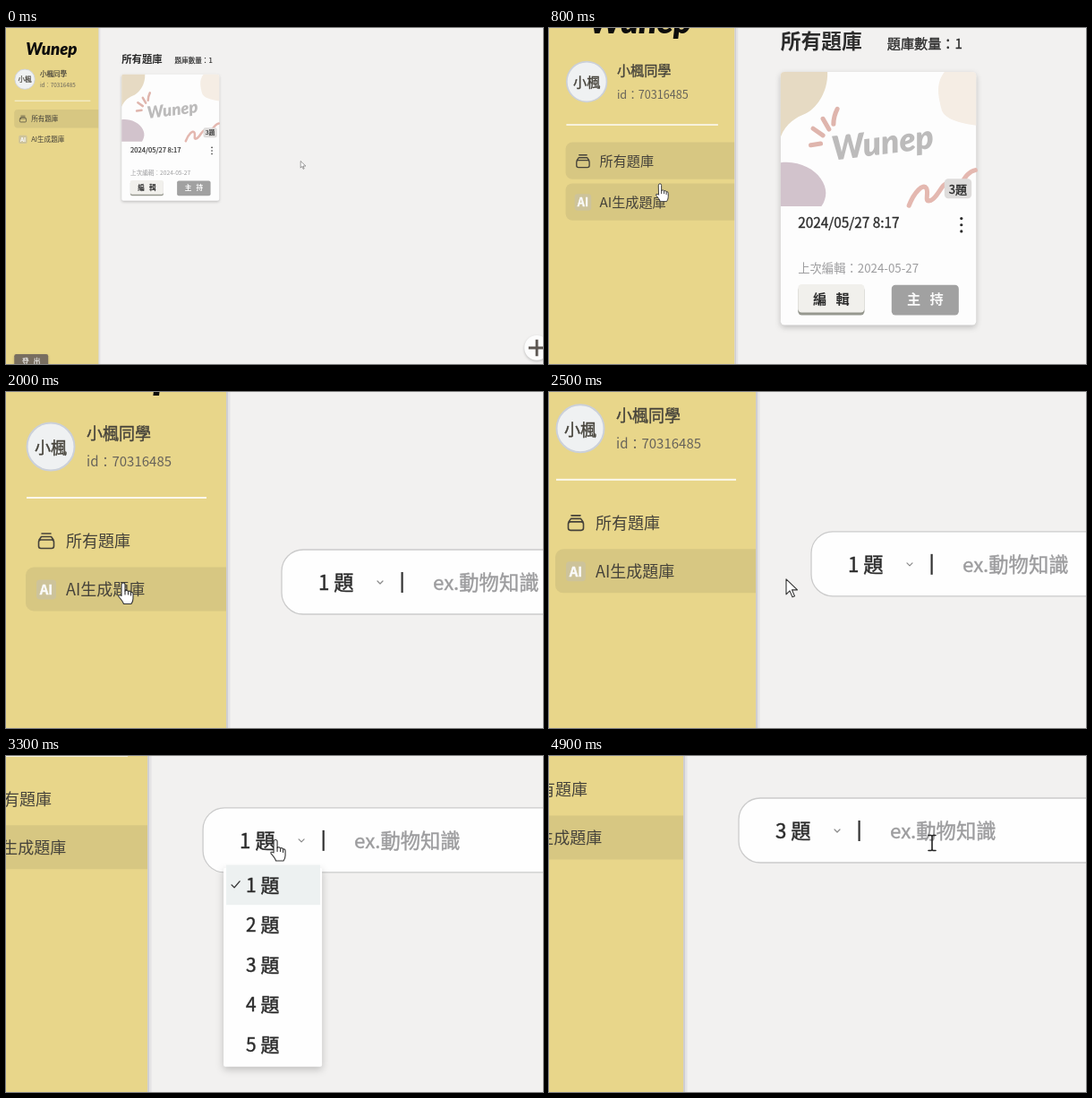
Write an HTML page that moves like this. It is 600x375 px and loops after 5000 ms.

```html
<!DOCTYPE html>
<html lang="zh-Hant">
<head>
<meta charset="utf-8">
<style>
html, body { margin: 0; width: 100%; height: 100%; overflow: hidden; background: #f2f1f0; }
svg { display: block; width: 600px; height: 375px; }
text { font-family: "Noto Sans CJK TC", "Noto Sans CJK", sans-serif; fill: #45423a; color: #45423a; white-space: pre; }
.mid { text-anchor: middle; }
.med { stroke: currentColor; stroke-width: .4px; }
.bold { font-weight: 700; }
.ink { fill: #2b2b2b; color: #2b2b2b; }
.dim { fill: #67635a; }
.grey { fill: #9c9c9e; color: #9c9c9e; }
.white { fill: #fafafa; color: #fafafa; }
.word { font: italic 900 44px Lato, sans-serif; text-anchor: middle; }
.shade { filter: drop-shadow(0 3px 4px rgba(0, 0, 0, .22)); }
</style>
</head>
<body>
<svg viewBox="0 0 600 375"><g id="world"></g></svg>
<script>
// x, vertical centre, size, text, classes
const text = (x, y, size, str, cls = '') =>
  `<text x="${x}" y="${y + size * .37}" font-size="${size}" class="${cls}">${str}</text>`;
const rect = (x, y, w, h, fill, r = 0, more = '') =>
  `<rect x="${x}" y="${y}" width="${w}" height="${h}" rx="${r}" fill="${fill}" ${more}/>`;
const path = (d, fill, more = '') => `<path d="${d}" fill="${fill}" ${more}/>`;
const stroke = (color, w) => `stroke="${color}" stroke-width="${w}" stroke-linecap="round" stroke-linejoin="round"`;
const tint = 'rgba(95,88,72,.12)';
const optionY = i => 337 + 44.6 * i;

const sidebar = `
  ${rect(-10, -10, 260, 1300, '#e8d68a')}
  <text class="word" x="121" y="72" style="fill:#0c0c0c">Wunep</text>
  <circle cx="50" cy="136" r="26.5" fill="#eff1f2" stroke="#cbd0d9" stroke-width="2"/>
  ${text(50, 137, 18, '小楓', 'mid med')}
  ${text(90, 121, 18, '小楓同學', 'med')}
  ${text(90, 152.5, 15, 'id：70316485', 'dim')}
  ${rect(23, 192, 201, 2, '#fbf8ec')}
  ${rect(22, 216, 240, 49, tint, 9, 'id="allItem"')}
  ${rect(22, 270.5, 240, 49, tint, 9, 'id="aiItem"')}
  ${path('M40 233h10M37 240l2.500-3.500h11l2.500 3.500M39 240h12q2.500 0 2.500 2.500v4.500q0 2.500-2.500 2.500h-12q-2.500 0-2.500-2.500v-4.500q0-2.500 2.500-2.500z', 'none', stroke('#45423a', 1.6))}
  ${text(67, 241, 18, '所有題庫')}
  ${rect(34, 284.5, 22, 22, '#cdc39a', 4)}
  ${text(45, 295.5, 15, 'AI', 'mid bold white med')}
  ${text(67, 295.5, 18, 'AI生成題庫')}
  ${rect(22, 865, 90, 41, '#786e60', 5, 'class="shade"')}
  ${text(67, 885, 18, '登   出', 'mid med white')}
  ${rect(246, -10, 1400, 1300, '#f2f1f0')}
  ${rect(246, -10, 2, 1300, '#cfced2')}${rect(248, -10, 2.5, 1300, '#e4e3e4')}`;

const bankPage = `<g id="bankPage">
  ${text(307, 82, 27, '所有題庫', 'bold ink')}
  ${text(448, 85.2, 18, '題庫數量：1', 'med ink')}
  ${rect(307, 123, 259, 335, '#fdfdfd', 5, 'class="shade"')}
  ${path('M307 209C314 190 328 183 340 178S370 152 369 123H312Q307 123 307 128Z', '#e6dac3')}
  ${path('M307 243C330 240 351 251 360 264S369 289 361 301H307Z', '#d2c3cc')}
  ${path('M524 123C511 140 517 158 520 172S546 191 566 194V128Q566 123 561 123Z', '#f5ede4')}
  ${path('M477 300C484 282 496 270 500 277S496 297 506 293S521 268 529 271S527 286 537 281S550 256 565 253', 'none', stroke('#e4b8b0', 6))}
  ${path('M382 172Q377 182 377 192M363 185L371 199M350 198L363 207M347 220L360 218', 'none', stroke('#dfb5ad', 6))}
  <text class="word" x="442" y="232" transform="rotate(-7 442 217)" style="fill:#bcbbbb">Wunep</text>
  ${rect(524, 264.5, 36, 26, '#dedcdb', 5)}
  ${text(542, 278, 15.5, '3題', 'mid med ink')}
  ${text(330, 323, 18.2, '2024/05/27 8:17', 'med ink')}
  ${[317, 325.5, 334].map(y => `<circle cx="546.5" cy="${y}" r="1.9" class="ink"/>`).join('')}
  ${text(330, 383, 15.8, '上次編輯：2024-05-27', 'grey')}
  ${rect(330, 407, 88, 38, '#96988f', 5)}${rect(330, 404, 88, 37.5, '#f1f0ec', 5)}
  ${text(374, 423.5, 18, '編   輯', 'mid bold ink')}
  ${rect(454, 405, 89, 40, '#a1a1a1', 5)}
  ${text(498.5, 424, 18, '主   持', 'mid bold white')}
  <circle cx="1409" cy="848" r="33" fill="#fcfcfc" class="shade"/>
  ${path('M1387 848h44M1409 826v44', 'none', 'stroke="#5c5652" stroke-width="7"')}
</g>`;

const aiPage = `<g id="aiPage">
  ${rect(308, 251, 1000, 72, '#fefefe', 24, 'stroke="#cbcbcb" stroke-width="1.3"')}
  <g id="value"></g>
  ${path('M415 286l3 3l3-3', 'none', stroke('#8a8a8a', 1.2))}
  ${rect(441.5, 276, 2.2, 23, '#333')}
  ${text(477, 288, 22.3, 'ex.動物知識', 'med grey')}
  <g id="menu">
    ${rect(331, 318, 110, 222, '#fefefe', 2, 'class="shade"')}
    ${rect(334, 0, 105, 44.6, '#edf1f1', 0, 'id="hover"')}
    ${path('M340 337l3 3l6-7', 'none', stroke('#333', 1.4))}
    ${[1, 2, 3, 4, 5].map((n, i) => text(356, optionY(i), 21, n + ' 題', 'med ink')).join('')}
  </g>
</g>`;

const outline = stroke('#333', 1.1);
const cursors = {
  arrow: path('M0 0v17l4-4l3 7l2.500-1l-3-7h6z', '#fff', outline),
  hand: path('M-2 2a2 2 0 0 1 4 0v7q2-1.500 3.500.5q2-1 3 1q2.500-.5 2.500 2v5q0 3-2 6h-8.500q-1-3-5.500-8q-1-2.500 2.500-1.500l.5.5z', '#fff', outline) +
    path('M2 9v4M5.500 10v3M8.500 11v3', 'none', outline),
  beam: path('M-4-8.500h3l1 1l1-1h3M0-7.500v15M-4 8.500h3l1-1l1 1h3', 'none', stroke('#222', 1.6))
};

const $ = id => document.getElementById(id);
$('world').innerHTML = sidebar + bankPage + aiPage + '<g id="cursor"></g>';

// time, x, y of the pointer
const keys = [
  [0, 782, 354], [100, 782, 354], [800, 147, 271], [1500, 131, 288], [2100, 131, 288], [2500, 280, 304],
  [2900, 389, 285], [3350, 389, 287], [3950, 386, 416], [4100, 386, 416], [4750, 524, 301], [5000, 524, 301]
];

// monotone cubic through the keys
function along(t, c) {
  const i = Math.max(1, keys.findIndex(k => k[0] > t)) - 1;
  const slope = j => keys[j] && keys[j + 1] ? (keys[j + 1][c] - keys[j][c]) / (keys[j + 1][0] - keys[j][0]) : 0;
  const tangent = j => {
    const a = slope(j - 1), b = slope(j);
    return a * b > 0 ? 2 * a * b / (a + b) : 0;
  };
  const d = keys[i + 1][0] - keys[i][0], u = (t - keys[i][0]) / d, v = 1 - u;
  return keys[i][c] * v * v * (1 + 2 * u) + keys[i + 1][c] * u * u * (3 - 2 * u) +
    d * u * v * (tangent(i) * v - tangent(i + 1) * u);
}

function ease(t, from, to) {
  const u = Math.min(1, Math.max(0, (t - from) / (to - from)));
  return u * u * (3 - 2 * u);
}

const show = (id, on) => $(id).setAttribute('visibility', on ? 'visible' : 'hidden');

function draw(t) {
  const zoom = ease(t, -117, 1268), pan = ease(t, 2150, 3550);
  const scale = .409 + .591 * zoom;
  $('world').setAttribute('transform', `translate(${-96 * pan} ${1.5 - 76.5 * zoom - 129 * pan}) scale(${scale})`);

  const x = along(t, 1), y = along(t, 2);
  const onAi = t >= 2000, open = t >= 3300 && t < 4150;
  const overAll = x < 246 && y > 216 && y < 265;
  const overItem = x < 246 && y > 270 && y < 320;
  const overField = onAi && x > 331 && y > 251 && y < 323;
  show('bankPage', !onAi);
  show('aiPage', onAi);
  show('allItem', !onAi || overAll);
  show('aiItem', onAi || overItem);
  show('menu', open);

  const option = Math.min(4, Math.max(0, Math.round((y + 9 - optionY(0)) / 44.6)));
  $('hover').setAttribute('y', optionY(option) - 22.3);
  $('value').innerHTML = text(349, 288, 22.3, (t < 4150 ? 1 : 3) + ' 題', 'med ink');

  const kind = overField && x > 445 ? 'beam' : overAll || overItem || overField || open ? 'hand' : 'arrow';
  $('cursor').innerHTML = cursors[kind];
  $('cursor').setAttribute('transform', `translate(${x} ${y})`);
}

const start = performance.now();
function tick() {
  const t = Math.max(0, performance.now() - start) % 5000;
  draw(Math.floor(t / 100) * 100);
  requestAnimationFrame(tick);
}
tick();
</script>
</body>
</html>
```
